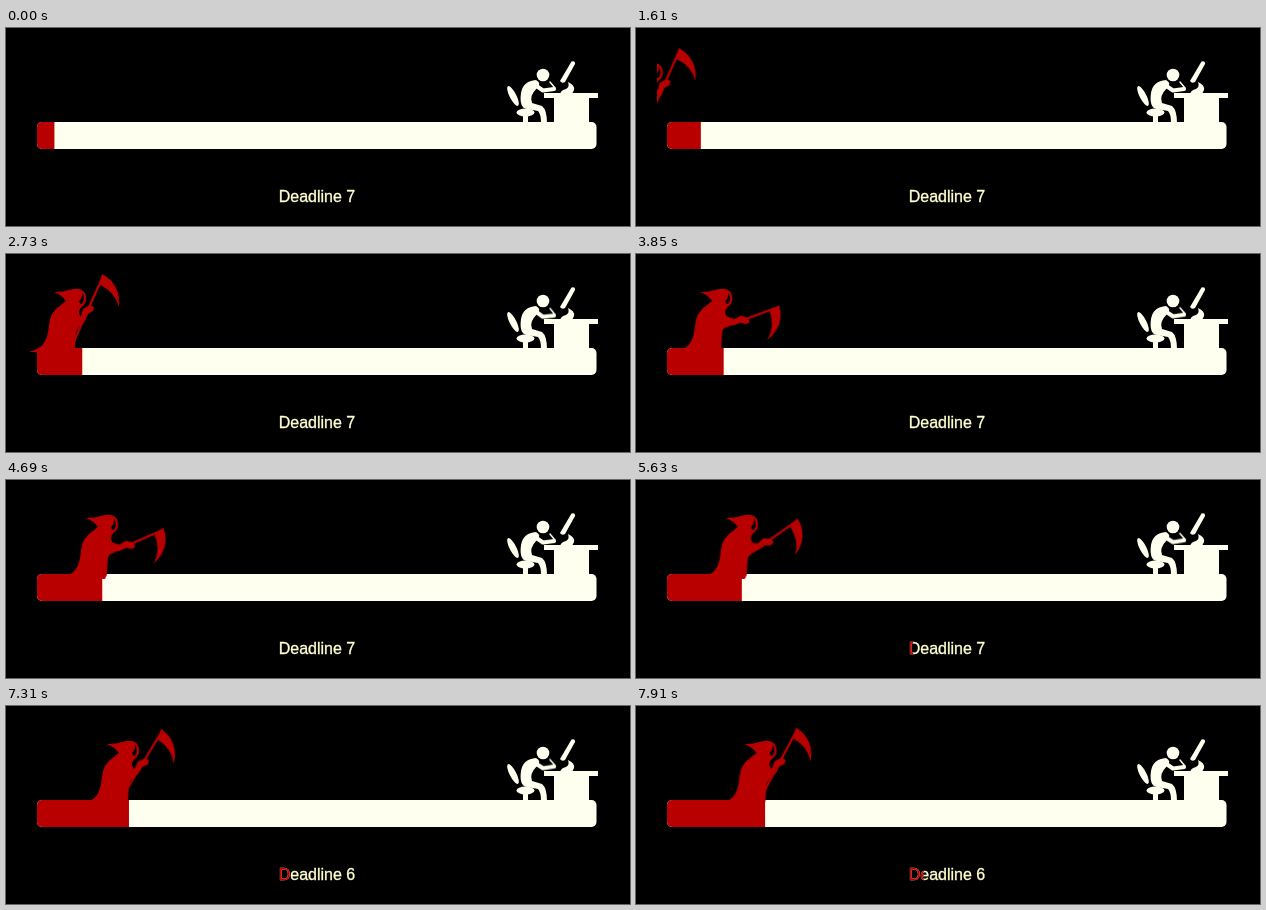
Recreate the animation shown at these times as an HTML page. Size 624x198 px, loop 8000 ms.

```html
<!DOCTYPE html>
<html lang="en">
<head>
<meta charset="utf-8">
<title>Deadline</title>
<style>
  html, body { margin: 0; width: 100%; height: 100%; overflow: hidden; background: #000; }
  svg { display: block; }
  text { font: 16px "Liberation Sans", Arial, sans-serif; fill: #ffffd0; stroke: #ffffd0; stroke-width: .35px; }
  text.red { stroke: #b90000; }
  .ivory { fill: #fffff0; }
  .red { fill: #b90000; }
  .line { fill: none; stroke: #fffff0; stroke-linecap: round; stroke-linejoin: round; }
  #arm { transform-origin: 74px 72px; }
  #hand { transform-origin: 528px 58px; }
</style>
</head>
<body>
<svg width="624" height="198" viewBox="0 0 624 198">
  <defs>
    <clipPath id="stage"><rect x="21" y="0" width="586" height="198"/></clipPath>
    <clipPath id="barShape"><rect x="31" y="94" width="559.5" height="27" rx="5"/></clipPath>
    <clipPath id="textFill"><rect id="textProgress" x="172" y="150" width="100" height="35"/></clipPath>
  </defs>

  <g clip-path="url(#barShape)">
    <rect class="ivory" x="31" y="94" width="560" height="28"/>
    <rect id="progress" class="red" x="-69" y="94" width="200" height="28"/>
  </g>

  <!-- designer at the desk -->
  <g class="ivory">
    <ellipse cx="507" cy="68" rx="3.3" ry="11" transform="rotate(-27 507 68)"/>
    <ellipse cx="519.5" cy="84.5" rx="9" ry="4"/>
    <path d="M517 86h5v9h-5z"/>
    <circle cx="537" cy="47" r="6.3"/>
    <path d="M530 52Q517 53 515 65Q513 80 521 81L532 83Q535 86 535 95H541Q541 82 536 78L526 75Q523 68 531 60Q536 55 530 52Z"/>
    <path d="M538 65h54v5h-9v25h-35v-25h-10z"/>
    <path d="M565.5 33.5Q569.5 32.5 569 36L559 54Q556 56 554 53Z"/>
    <path d="M562 54Q569 57 568 62L566 66H554Q555 62 560 61Q564 59 562 54Z"/>
  </g>
  <g id="hand" class="line">
    <path stroke-width="4" d="M529 57L537 62.5L548 61"/>
    <path stroke-width="1.5" d="M544 54L549 60"/>
  </g>

  <g clip-path="url(#stage)">
    <g id="death" class="red">
      <path fill-rule="evenodd" d="M47 38Q56 38 64 35.5Q74 33 78 39Q81 46 77 51Q72 54 72 59L75 66L69 78L68 95L66 99L22 98Q33 95 37 89Q41 83 42 71Q43 58 54 51L59 47Q55 41 47 38ZM75 38.5Q79 44 75 50Q72 50 72.5 47Q76 43 75 38.5Z"/>
      <g id="arm">
        <path d="M66 66L74 62L76 55L83 51L87 53L86 57L81 60L78 67L69 76Z"/>
        <path fill="none" stroke="#b90000" stroke-width="2.2" d="M65 92L96 22"/>
        <path d="M95 20Q114 30 112 53Q108 38 93 31Z"/>
      </g>
    </g>
  </g>

  <text x="272.7" y="174">Deadline</text>
  <text class="red" x="272.7" y="174" clip-path="url(#textFill)">Deadline</text>
  <text id="seven" x="340.3" y="174">7</text>
  <text id="six" x="340.3" y="174">6</text>
</svg>
<script>
  const LOOP = 8000;
  const moveX = x => ({ transform: `translateX(${x}px)` });
  const turn = deg => ({ transform: `rotate(${deg}deg)` });
  const show = opacity => ({ opacity });

  // Each step: [time in ms, value, easing towards the next step]
  function play(id, pose, steps, duration = LOOP) {
    const frames = steps.map(([time, value, easing = 'linear']) =>
      ({ ...pose(value), offset: time / duration, easing }));
    document.getElementById(id).animate(frames, { duration, iterations: Infinity });
  }

  play('progress', moveX, [[0, -82.6], [LOOP, -1]]);
  play('textProgress', moveX, [[0, 0], [4500, 0], [LOOP, 16]]);

  play('death', moveX, [
    [0, -93], [1000, -93, 'ease'],
    [3450, 6.5, 'cubic-bezier(.15,.35,.45,.95)'],
    [6700, 47, 'cubic-bezier(.35,.2,.75,.9)'],
    [LOOP, 62]
  ]);

  play('arm', turn, [
    [0, 0], [3300, 0, 'ease'],
    [3800, 46, 'cubic-bezier(.42,0,.62,.96)'],
    [LOOP, 4]
  ]);

  play('hand', turn, [
    [0, 0, 'ease-in-out'], [400, 2, 'ease-in-out'], [800, -2, 'ease-in-out'],
    [1200, 2, 'ease-in-out'], [1600, 0]
  ], 1600);

  play('seven', show, [[0, 1, 'step-end'], [5950, 0], [LOOP, 0]]);
  play('six', show, [[0, 0, 'step-end'], [5950, 1], [LOOP, 1]]);
</script>
</body>
</html>
```
